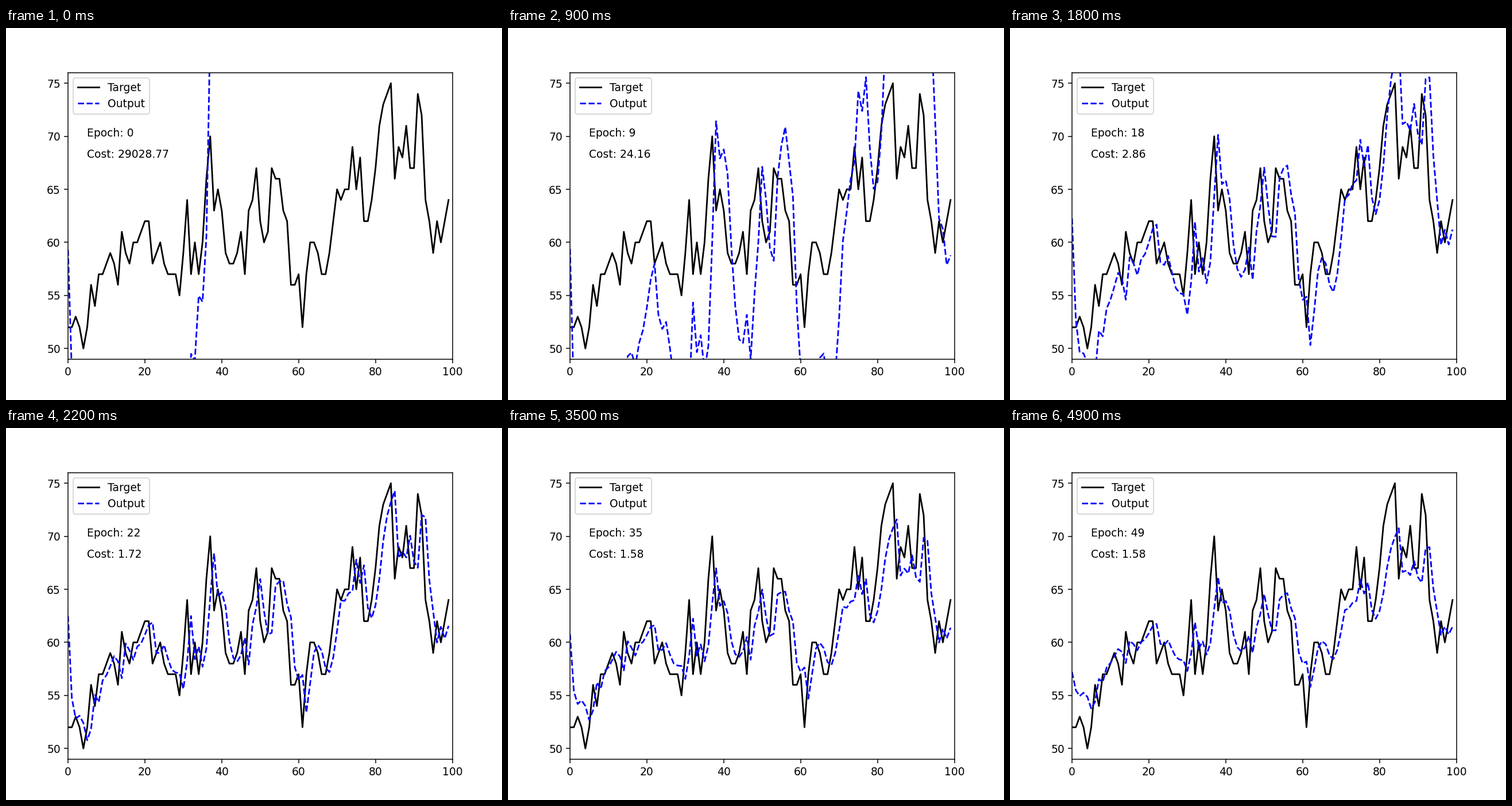
These frames come from a looping animation (864x648 px, 5000 ms). A matplotlib script:

```python
import numpy as np
import matplotlib.pyplot as plt
from matplotlib.animation import FuncAnimation

EPOCHS = 50
INTERVAL = 100

TARGET = np.array([
    52, 52, 53, 52, 50, 52, 56, 54, 57, 57, 58, 59, 58, 56, 61, 59, 58, 60, 60, 61,
    62, 62, 58, 59, 60, 58, 57, 57, 57, 55, 59, 64, 57, 60, 57, 60, 66, 70, 63, 65,
    63, 59, 58, 58, 59, 61, 57, 63, 64, 67, 62, 60, 61, 67, 66, 66, 63, 62, 56, 56,
    57, 52, 57, 60, 60, 59, 57, 57, 59, 62, 65, 64, 65, 65, 69, 65, 68, 62, 62, 64,
    67, 71, 73, 74, 75, 66, 69, 68, 71, 67, 67, 74, 72, 64, 62, 59, 62, 60, 62, 64])

# Learned state at a few epochs: input weight, recurrent weight, bias, start, cost
KNOTS = np.array([0, 9, 14, 22, 24, 30, 41, 49])
INPUT_W = [2.23, 1.42, 1.167, 0.734, 0.69, 0.64, 0.57, 0.488]
RECUR_W = [1.008, 0.57, 0.42, 0.248, 0.225, 0.21, 0.25, 0.318]
BIAS = [-128.11, -62.25, -36.65, 1.08, 5.3, 9.27, 11.1, 11.92]
START = [59.3, 59.4, 61.7, 62.5, 62.4, 61.7, 59.4, 57.2]
COST = [29028.77, 24.16, 6.71, 1.72, 1.66, 1.60, 1.57, 1.58]


def smooth(values):
    """Monotone cubic through the knots, sampled at every epoch."""
    y = np.asarray(values, float)
    step = np.diff(KNOTS)
    secant = np.diff(y) / step
    slope = np.zeros(len(y))
    for k in range(1, len(y) - 1):
        s, t = secant[k - 1], secant[k]
        if s * t > 0:
            slope[k] = 2 * s * t / (s + t)
    slope[0] = 1.5 * secant[0] - 0.5 * slope[1]
    slope[-1] = 1.5 * secant[-1] - 0.5 * slope[-2]

    x = np.arange(EPOCHS)
    k = np.clip(np.searchsorted(KNOTS, x, side="right") - 1, 0, len(step) - 1)
    h = step[k]
    u = (x - KNOTS[k]) / h
    return ((1 + 2 * u) * (1 - u) ** 2 * y[k] + u * (1 - u) ** 2 * h * slope[k]
            + u * u * (3 - 2 * u) * y[k + 1] + u * u * (u - 1) * h * slope[k + 1])


input_w, recur_w, bias, start = map(smooth, (INPUT_W, RECUR_W, BIAS, START))
cost = np.exp(smooth(np.log(COST)))


def predict(epoch):
    out = [start[epoch]]
    for value in TARGET[:-1]:
        out.append(input_w[epoch] * value + recur_w[epoch] * out[-1] + bias[epoch])
    return out


plt.rcParams["font.family"] = "DejaVu Sans"
fig, ax = plt.subplots(figsize=(6.4, 4.8), dpi=135)
ax.set_xlim(0, 100)
ax.set_ylim(49, 76)
steps = np.arange(len(TARGET))
ax.plot(steps, TARGET, "k-", label="Target")
output_line, = ax.plot(steps, predict(0), "b--", label="Output")
ax.legend(loc="upper left")
epoch_text = ax.text(5, 70, "")
cost_text = ax.text(5, 68, "")


def update(epoch):
    output_line.set_ydata(predict(epoch))
    epoch_text.set_text(f"Epoch: {epoch}")
    cost_text.set_text(f"Cost: {cost[epoch]:.2f}")
    return output_line, epoch_text, cost_text


anim = FuncAnimation(fig, update, frames=EPOCHS, interval=INTERVAL,
                     repeat=True, repeat_delay=0)
plt.show()
```
